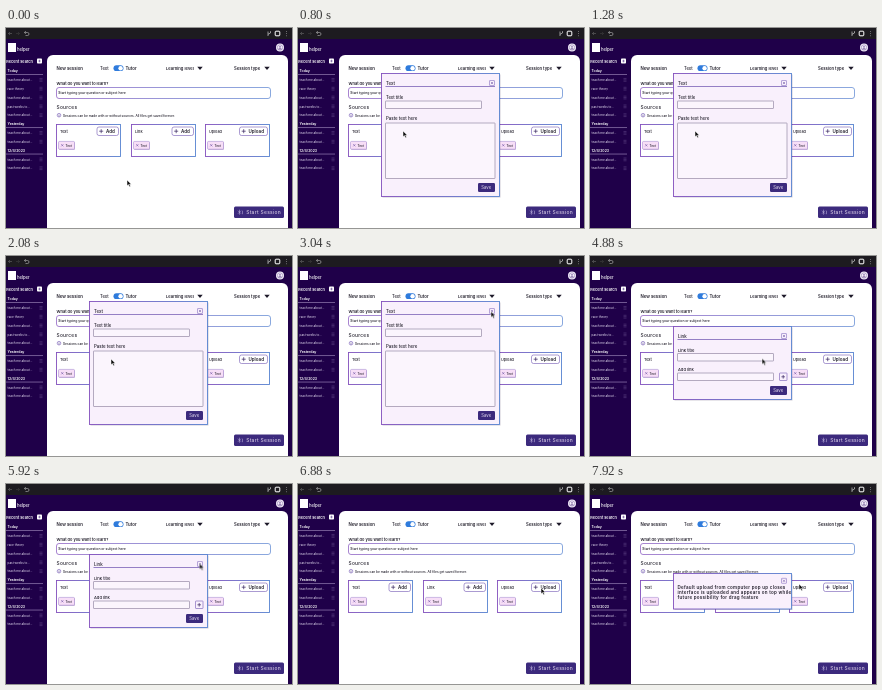
These frames come from a looping animation (286x200 px, 8 s). An HTML page:

```html
<!DOCTYPE html>
<html lang="en">
<head>
<meta charset="utf-8">
<title>Study session</title>
<style>
html, body { margin: 0; width: 100%; height: 100%; overflow: hidden; background: #1f0049; }
svg { display: block; width: 286px; height: 200px; }
text { font-family: Inter, "Open Sans", sans-serif; font-weight: 500; fill: #221f2b; }
.b { font-weight: 600; }
.w { fill: #fff; }
.dim { fill: #d3c8e2; }
.wide { letter-spacing: .06em; }
.line { fill: none; stroke: #7358b4; stroke-width: .6; }
.field { fill: #fbf5fd; stroke: #857a98; stroke-width: .6; }
.edge { stroke: url(#edge); stroke-width: .9; }
.dialog, #cursor { animation: 8s infinite; }
.dialog { visibility: hidden; animation-timing-function: step-end; }
#textDialog { animation-name: textDialog; }
#linkDialog { animation-name: linkDialog; }
#uploadDialog { animation-name: uploadDialog; }
#cursor { animation-name: cursor; animation-timing-function: ease-in-out; }
@keyframes textDialog { 0%, 39%, 100% { visibility: hidden; } 10% { visibility: visible; } }
@keyframes linkDialog { 0%, 75%, 100% { visibility: hidden; } 54% { visibility: visible; } }
@keyframes uploadDialog { 0% { visibility: hidden; } 88%, 100% { visibility: visible; } }
@keyframes cursor {
  0%, 1% { transform: translate(121px, 152px); }
  4% { transform: translate(107px, 104px); }
  7%, 28% { transform: translate(105px, 103px); }
  33% { transform: translate(192px, 57px); }
  35%, 39% { transform: translate(193px, 55.5px); }
  47%, 61% { transform: translate(172px, 102.5px); }
  70%, 76% { transform: translate(193.5px, 79.5px); }
  81% { transform: translate(241px, 105px); }
  84%, 93% { transform: translate(243px, 104px); }
  99%, 100% { transform: translate(209px, 100px); }
}
</style>
</head>
<body>
<svg id="stage" viewBox="0 0 286 200"></svg>
<script>
const text = (x, y, size, value, cls = '') =>
  `<text x="${x}" y="${y}" font-size="${size}" class="${cls}">${value}</text>`;
const box = (x, y, w, h, attrs = '', r = 0) =>
  `<rect x="${x}" y="${y}" width="${w}" height="${h}" rx="${r}" ${attrs}/>`;
const path = (d, color, width = .7) =>
  `<path d="${d}" fill="none" stroke="${color}" stroke-width="${width}"/>`;
const plus = (x, y, r = 2) => path(`M${x - r} ${y}h${2 * r}M${x} ${y - r}v${2 * r}`, '#35235f', .7);
const cross = (x, y, r) => path(`M${x - r} ${y - r}l${2 * r} ${2 * r}m0 ${-2 * r}l${-2 * r} ${2 * r}`, '#5b3f96', .5);
const arrow = (x, y) => `<path d="M${x - 2.7} ${y - 1.5}h5.4l-2.7 3.2z" fill="#1d1929"/>`;
const field = (x, y, w, h) => box(x, y, w, h, 'class="field"', .4);

function browserBar() {
  return box(0, 0, 286, 11, 'fill="#1d1b20"') +
    path('M6 5.5H2.5m1.5-1.5l-1.5 1.5 1.5 1.5', '#777', .5) +
    path('M10 5.5h3.5m-1.5-1.5l1.5 1.5-1.5 1.5', '#444', .5) +
    path('M18.5 4.5h3a1.4 1.4 0 0 1 0 3h-2m.3-4.5l-1.3 1.5 1.3 1.5', '#bbb', .6) +
    path('M262 8V3.5m0 2.8l2.5-1.3V3.2', '#ccc', .7) +
    box(269.2, 3.2, 4.6, 4.6, 'fill="none" stroke="#fff" stroke-width="1"', .8) +
    path('M280.5 3v.8m0 1.4v.8m0 1.4v.8', '#aaa', .7);
}

function sidebar() {
  const rows = ['Today', 'teach me about...', 'race theory', 'teach me about...', 'past weeks to...',
    'teach me about...', 'Yesterday', 'teach me about...', 'teach me about...', '12/4/2023',
    'teach me about...', 'teach me about...'];
  const heads = [0, 6, 9];
  return box(2, 15, 8, 9, 'fill="#fff"') + text(11, 23.4, 4.2, 'helper', 'w') +
    text(.3, 34.5, 3.85, 'Recent search', 'w b') +
    box(31, 30.5, 5, 5, 'fill="#fff"', .8) +
    path('M32.2 33h2.6m-1.3-1.3v2.6', '#42207c', .5) +
    rows.map((label, i) => {
      const y = 44.2 + i * 8.84, head = heads.includes(i);
      return text(1.5, y, head ? 3.5 : 3, label, head ? 'w b' : 'dim') +
        (head ? path(`M0 ${y + 2.3}h37`, '#a994c4', .6)
          : path(`M33.5 ${y - 2.6}h3m-3 1.4h3m-3 1.4h3`, '#6f5593', .45));
    }).join('');
}

function card(x, title, action, width) {
  const left = x + 62 - width;
  return box(x, 96.5, 64, 32, 'fill="#fff" class="edge"') +
    text(x + 3.5, 105, 3.8, title) +
    box(left, 99, width, 8.5, 'class="line"', 2) +
    plus(left + 4.2, 103.2) + text(left + 9, 104.8, 4.5, action, 'b') +
    box(x + 2.5, 114, 16, 8, 'fill="#cbbfda"', 1) +
    box(x + 2, 113.4, 16, 7.8, 'fill="#f7def7" stroke="#9a7fca" stroke-width=".5"', 1) +
    cross(x + 5.8, 117.3, 1.1) + text(x + 9, 118.5, 3.1, 'Text');
}

function page() {
  return `<path d="M41 200V33a6 6 0 0 1 6-6h229a6 6 0 0 1 6 6v167z" fill="#fff"/>` +
    '<circle cx="274" cy="19.5" r="4" fill="#f4effa"/>' +
    '<circle cx="274" cy="19.5" r="2.7" fill="none" stroke="#8d78ad" stroke-width=".6"/>' +
    '<circle cx="274" cy="18.8" r=".9" fill="#8d78ad"/><path d="M272.2 21.5a1.8 1.5 0 0 1 3.6 0z" fill="#8d78ad"/>' +
    text(50.5, 42, 4.3, 'New session', 'b') +
    text(94, 42, 4.2, 'Text') +
    box(107.5, 37.3, 10, 5.8, 'fill="#2f7bdc"', 2.9) +
    '<circle cx="114.6" cy="40.2" r="2.2" fill="#fff"/>' +
    text(119.5, 42, 4.4, 'Tutor', 'b') +
    text(160, 42, 4.1, 'Learning level', 'b') + arrow(194, 40.2) +
    text(228, 42, 4.2, 'Session type', 'b') + arrow(261, 40.2) +
    text(50.5, 57, 3.95, 'What do you want to learn?', 'b') +
    box(50.5, 59.5, 214, 11, 'fill="#fff" class="edge" style="stroke-width:.7"', 2.5) +
    text(52.3, 66.3, 3.4, 'Start typing your question or subject here') +
    text(50.5, 81.3, 4.8, 'Sources', 'wide') +
    '<circle cx="53" cy="87.2" r="1.8" class="line"/>' + path('M53 86.1v.5m0 .5v1.4', '#4a3488', .6) +
    text(57, 88.5, 3.2, 'Sessions can be made with or without sources. All files get saved forever.') +
    card(50.5, 'Text', 'Add', 21.5) +
    card(125.5, 'Link', 'Add', 21.5) +
    card(199.5, 'Upload', 'Upload', 28) +
    box(228, 178.5, 50, 11.5, 'fill="#3c2a7d"', 1.5) +
    path('M233.5 181.7v5m-1.5-4l3 3m0-3l-3 3m4.5-3v3.5', '#c9bfe6', .5) +
    text(240.2, 186, 4.9, 'Start Session', 'wide dim');
}

const save = y => box(180, y, 17, 9, 'fill="#3c2a7d"', 1.2) + text(183.3, y + 6, 4.2, 'Save', 'dim');

function dialog(id, top, height, body, title) {
  const mark = top + (title ? 7 : 4.8);
  return `<g id="${id}" class="dialog">` +
    box(84.5, top + 1, 118, height, 'fill="#24133f" opacity=".22"') +
    box(83.5, top, 118, height, 'fill="#f9f0fc" class="edge"') +
    box(191.5, mark, 5, 5, 'class="line" style="stroke-width:.5"', .4) + cross(194, mark + 2.5, 1.1) +
    (title ? text(88, top + 11.7, 4.4, title) + path(`M87.5 ${top + 13}H197`, '#6b4fae', .7) : '') +
    body + '</g>';
}

const textBody = text(88, 71.3, 4.2, 'Text title') + field(87.5, 73, 96, 7.5) +
  text(88, 92, 4.4, 'Paste text here') + field(87.5, 95, 109.5, 55.5) + save(155);

const linkBody = text(88, 95.8, 4.1, 'Link title') + field(87.5, 97.5, 96, 7.5) +
  text(88, 115.2, 4.1, 'Add link') + field(87.5, 117, 96, 7.5) +
  box(189.5, 117, 7.5, 7.5, 'class="line"', .5) + plus(193.2, 120.8, 1.8) + save(130);

const uploadBody = [
  'Default upload from computer pop up closes',
  'interface is uploaded and appears on top while',
  'future possibility for drag feature'
].map((line, i) => text(87.5, 104.7 + i * 5.3, 4.5, line, 'b wide')).join('');

document.getElementById('stage').innerHTML = `<defs>
  <linearGradient id="edge"><stop stop-color="#8350bd"/><stop offset="1" stop-color="#5783d0"/></linearGradient>
  </defs>` +
  box(0, 0, 286, 200, 'fill="#1f0049"') + browserBar() + sidebar() + page() +
  dialog('textDialog', 45.5, 123, textBody, 'Text') +
  dialog('linkDialog', 70.5, 73, linkBody, 'Link') +
  dialog('uploadDialog', 89.5, 35.5, uploadBody) +
  '<g id="cursor"><path d="M0 0v5.8l1.4-1.2 1 2.2 1.1-.5-1-2.1h1.8z" fill="#111" stroke="#fff" stroke-width=".5"/></g>';
</script>
</body>
</html>
```
